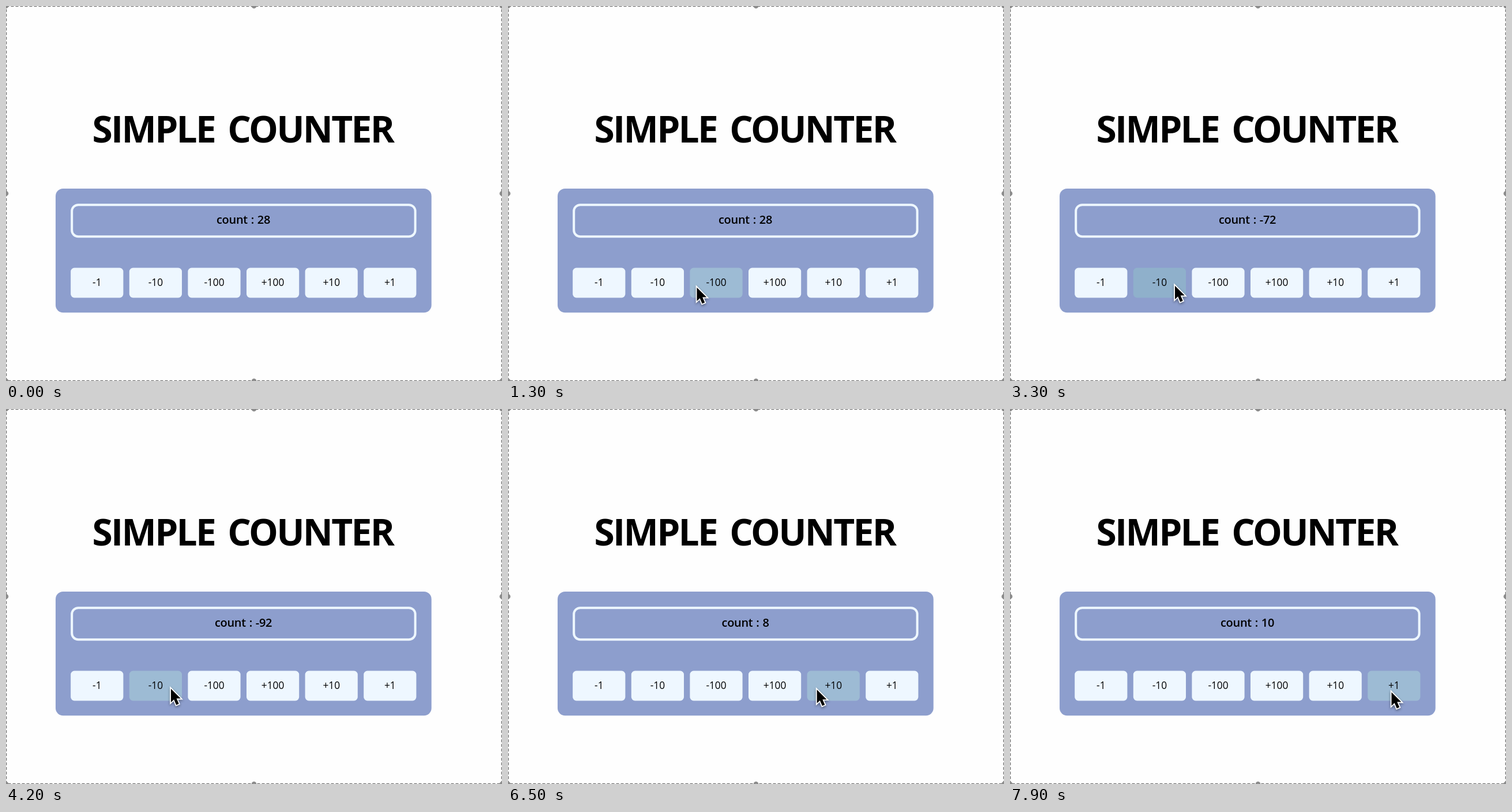
Recreate the animation shown at these times as an HTML page with a canvas. Size 860 px wide and 651 px high, loop 8000 ms.

```html
<!DOCTYPE html>
<html lang="en">
<head>
<meta charset="utf-8">
<title>Simple counter</title>
<style>
  html, body { margin: 0; width: 100%; height: 100%; overflow: hidden; background: #fefefe; }
  canvas { display: block; }
</style>
</head>
<body>
<canvas id="stage" width="860" height="651"></canvas>
<script>
const ctx = document.getElementById('stage').getContext('2d');
const W = 860, H = 651, LOOP = 8000, STEP = 100, CX = 411.7;
const FONT = '"Open Sans", "Noto Sans", sans-serif';
const COLOR = { page: '#fefefe', panel: '#8d9ecd', light: '#eef7ff', hover: '#9dbbd4', press: '#8fb0cb' };
const LABELS = ['-1', '-10', '-100', '+100', '+10', '+1'];

const easeOut = power => k => 1 - (1 - k) ** power;
const linear = easeOut(1);
const overshoot = k => 1 + 4 * (k - 1) ** 3 + 3 * (k - 1) ** 2;

// The pointer enters at ENTRY and then glides from button to button
const ENTRY = { x: 269, y: 588 };
const MOVES = [
  { from: 200, to: 1300, x: 326, y: 484, easeX: linear, easeY: easeOut(3) },
  { from: 2800, to: 3100, x: 284.5, y: 481, easeX: linear, easeY: linear },
  { from: 4600, to: 5100, x: 488, y: 481, easeX: overshoot, easeY: linear },
  { from: 6400, to: 6900, x: 660, y: 487, easeX: easeOut(1.4), easeY: easeOut(1.4) }
];

const CLICKS = [
  { down: 1800, up: 2000, add: -100 },
  { down: 3300, up: 3500, add: -10 },
  { down: 3900, up: 4200, add: -10 },
  { down: 5300, up: 5500, add: 100 },
  { down: 7200, up: 7400, add: 1 },
  { down: 7700, up: 7900, add: 1 }
];

const buttonBox = i => ({ x: 112.2 + 101.6 * i, y: 454.5, w: 91.2, h: 52 });

function pointerAt(t) {
  if (t < MOVES[0].from) return null;
  let { x, y } = ENTRY;
  for (const m of MOVES) {
    const k = Math.min(1, Math.max(0, (t - m.from) / (m.to - m.from)));
    if (k === 0) break;
    x += (m.x - x) * m.easeX(k);
    y += (m.y - y) * m.easeY(k);
  }
  return { x, y };
}

function isOver(p, b) {
  const x = p.x + 2.5, y = p.y + 3;
  return x >= b.x && x <= b.x + b.w && y >= b.y && y <= b.y + b.h;
}

function roundBox(x, y, w, h, r) {
  ctx.beginPath();
  ctx.roundRect(x, y, w, h, r);
}

function text(str, x, y, size, weight, tracking = 0, wordGap = 0) {
  ctx.font = `${weight} ${size}px ${FONT}`;
  ctx.letterSpacing = tracking + 'px';
  ctx.wordSpacing = wordGap + 'px';
  ctx.fillStyle = '#000';
  ctx.textAlign = 'center';
  ctx.fillText(str, x + tracking / 2, y);
}

function drawFrame() {
  ctx.strokeStyle = '#777';
  ctx.lineWidth = 1.6;
  ctx.setLineDash([5, 3]);
  ctx.strokeRect(0.5, 0.5, W - 1, H - 1);
  ctx.setLineDash([]);
  ctx.fillStyle = '#8c8c8c';
  for (const fx of [0, 0.5, 1]) {
    for (const fy of [0, 0.5, 1]) {
      if (fx === 0.5 && fy === 0.5) continue;
      ctx.beginPath();
      ctx.arc(fx * W, fy * H, 4.3, 0, Math.PI * 2);
      ctx.fill();
    }
  }
}

function drawPointer({ x, y }) {
  ctx.save();
  ctx.translate(x - 0.5, y + 0.7);
  const arrow = new Path2D('M2 4V27.5L7.2 22.6L11.2 32L15.7 30.1L11.7 20.9H18.8Z');
  ctx.lineJoin = 'miter';
  ctx.lineWidth = 3.6;
  ctx.strokeStyle = '#fff';
  ctx.shadowColor = 'rgba(0,0,0,.4)';
  ctx.shadowBlur = 4;
  ctx.shadowOffsetY = 2;
  ctx.stroke(arrow);
  ctx.shadowColor = 'transparent';
  ctx.fillStyle = '#000';
  ctx.fill(arrow);
  ctx.restore();
}

function draw(t) {
  const pointer = pointerAt(t);
  const pressed = CLICKS.some(c => t >= c.down && t < c.up);
  const count = CLICKS.reduce((sum, c) => t >= c.up ? sum + c.add : sum, 28);

  ctx.fillStyle = COLOR.page;
  ctx.fillRect(0, 0, W, H);
  drawFrame();
  text('SIMPLE COUNTER', CX, 237, 64, 700, -2.7, 8);

  ctx.fillStyle = COLOR.panel;
  roundBox(86, 317, 651.7, 215.3, 13);
  ctx.fill();

  ctx.strokeStyle = COLOR.light;
  ctx.lineWidth = 4;
  roundBox(114.2, 345.2, 595.4, 55, 11);
  ctx.stroke();
  text('count : ' + count, CX, 378, 20, 600, -0.3, 1);

  LABELS.forEach((label, i) => {
    const b = buttonBox(i);
    const over = pointer && isOver(pointer, b);
    ctx.fillStyle = !over ? COLOR.light : pressed ? COLOR.press : COLOR.hover;
    roundBox(b.x, b.y, b.w, b.h, 6.5);
    ctx.fill();
    text(label, b.x + b.w / 2, 486, 17.3, 500);
  });

  if (pointer) drawPointer(pointer);
}

const start = performance.now();
function tick() {
  const t = (performance.now() - start) % LOOP;
  draw(Math.floor(t / STEP) * STEP);
  requestAnimationFrame(tick);
}
tick();
</script>
</body>
</html>
```
